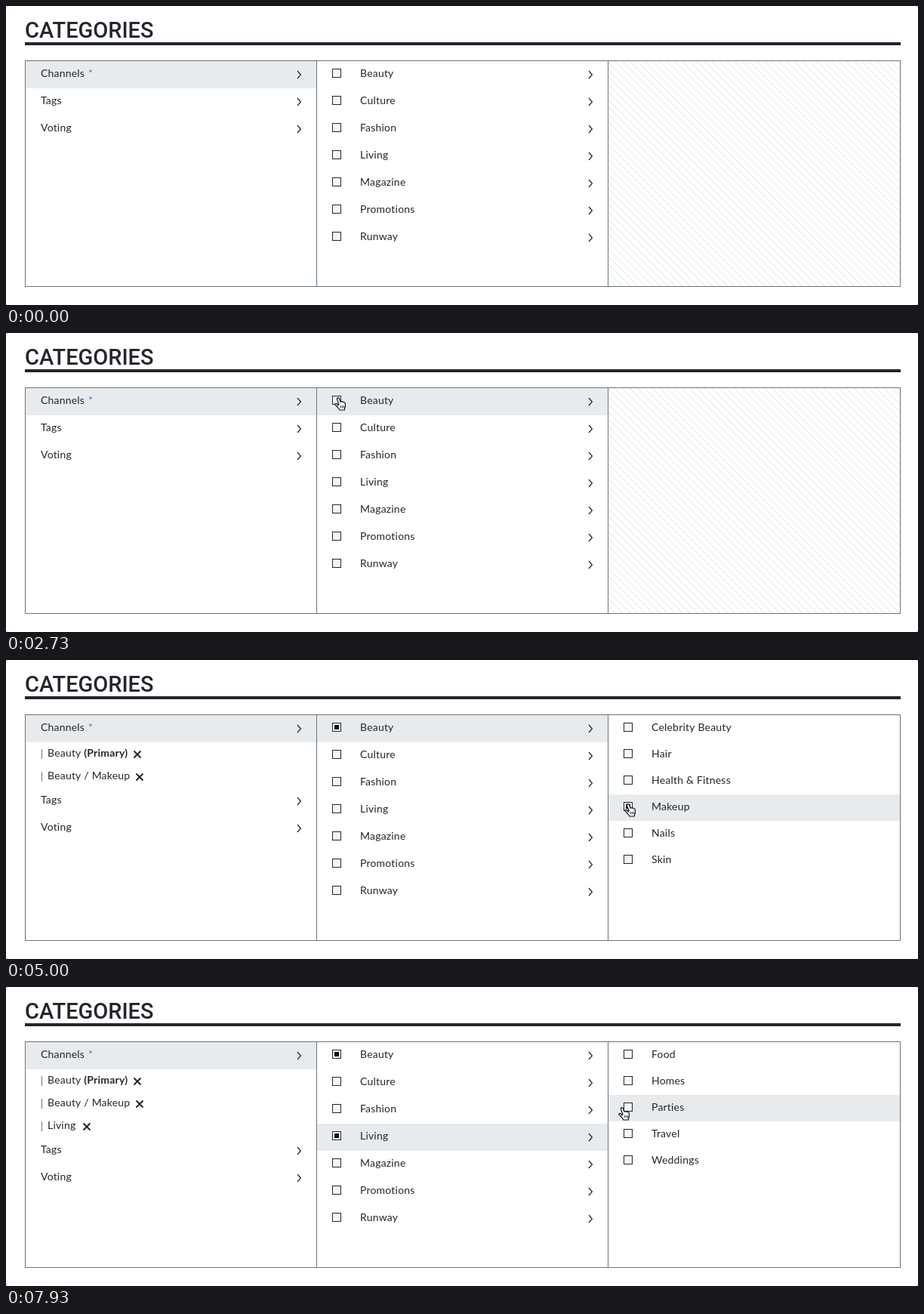
An HTML page with a canvas that plays this animation: 1208 px wide and 396 px high, repeating every 8000 ms.

```html
<!DOCTYPE html>
<html lang="en">
<head>
<meta charset="utf-8">
<title>Categories</title>
<style>
  html, body { margin: 0; width: 100%; height: 100%; overflow: hidden; background: #fff; }
  canvas { display: block; }
</style>
</head>
<body>
<canvas id="stage" width="1208" height="396"></canvas>
<script>
const ctx = document.getElementById('stage').getContext('2d');
const LOOP = 8000;
const INK = '#22262d', EDGE = '#69757d', SHADE = '#e8ebee';
const TOP = 73, BOTTOM = 371, COLS = [26, 412, 798], COL_W = 385;
const ROW = 36, SUB_ROW = 35, CHIP_ROW = 30;

const channels = ['Beauty', 'Culture', 'Fashion', 'Living', 'Magazine', 'Promotions', 'Runway'];
const subLists = {
  Beauty: ['Celebrity Beauty', 'Hair', 'Health & Fitness', 'Makeup', 'Nails', 'Skin'],
  Living: ['Food', 'Homes', 'Parties', 'Travel', 'Weddings']
};
const chips = [
  { at: 2900, label: 'Beauty', bold: '(Primary)', closeX: 174 },
  { at: 4620, label: 'Beauty / Makeup', closeX: 177 },
  { at: 6500, label: 'Living', closeX: 107 }
];
const selections = [
  { name: 'Beauty', at: 2900, ready: 3500 },
  { name: 'Living', at: 6500, ready: 6950 }
];
const checkedAt = { Beauty: 2900, Makeup: 4620, Living: 6500 };

// Pointer hot spot: time, x, y
const SHOW_POINTER = 1730, HAND_FROM = 2100;
const path = [
  [1730, 540, 140], [1870, 438, 91], [2150, 438, 91], [2500, 440, 85],
  [3500, 440, 85], [4000, 838, 184], [4300, 824, 190], [5470, 824, 190],
  [6000, 538, 179], [6300, 436, 191], [7300, 436, 191], [7930, 816, 159],
  [8000, 816, 159]
];

const hand = new Path2D('M5.2 10.8L6 9.5 3.6 3C3.2 1.7 3.8.7 4.8.7S6.2 1.3 6.6 2.3L8 6.2' +
  'C8.6 5.4 9.8 5.4 10.2 6.3 10.9 5.7 12 5.9 12.3 6.9 13.3 6.5 14.2 7 14.3 8.2L14.5 11.5' +
  'C14.5 13.4 13.6 14.2 13.4 15.3V17H6.8C6.6 15.6 5 14.2 4 13 2.9 11.7 1.6 10.7.9 9.8' +
  '.5 9 1.2 8 2.3 8.3 3.5 8.6 4.6 10 5.2 10.8Z');
const knuckles = new Path2D('M8.2 11V14.3M10.3 11V14.3M12.3 11V14.3');
const arrow = new Path2D('M0 0V14.5L3.4 11.3 5.6 16.4 8 15.4 5.8 10.5H10.3Z');

function slope(i, axis) {
  if (i === 0 || i === path.length - 1) return 0;
  const rate = k => (path[k + 1][axis] - path[k][axis]) / (path[k + 1][0] - path[k][0]);
  const a = rate(i - 1), b = rate(i);
  return a * b <= 0 ? 0 : 2 * a * b / (a + b);
}

// Monotone cubic through the path points
function pointer(t) {
  let i = 0;
  while (i < path.length - 2 && path[i + 1][0] <= t) i++;
  const p = path[i], q = path[i + 1], d = q[0] - p[0];
  const u = Math.min(1, Math.max(0, (t - p[0]) / d)), v = 1 - u;
  return [1, 2].map(axis =>
    p[axis] * (1 + 2 * u) * v * v + q[axis] * u * u * (3 - 2 * u) +
    d * u * v * (slope(i, axis) * v - slope(i + 1, axis) * u));
}

function box(x, y, w, h, color) {
  ctx.fillStyle = color;
  ctx.fillRect(x, y, w, h);
}

function text(str, x, y, color = INK, weight = 400) {
  ctx.font = `${weight} 14px Lato, sans-serif`;
  ctx.letterSpacing = '0.2px';
  ctx.fillStyle = color;
  ctx.fillText(str, x, y);
  return ctx.measureText(str).width;
}

function line(points, color, width) {
  ctx.beginPath();
  points.forEach(([x, y]) => ctx.lineTo(x, y));
  ctx.strokeStyle = color;
  ctx.lineWidth = width;
  ctx.stroke();
}

function chevron(x, y) {
  line([[x - 2, y - 5], [x + 2.4, y], [x - 2, y + 5]], INK, 1.2);
}

function checkbox(x, y, on) {
  box(x, y, 12, 12, INK);
  box(x + 1, y + 1, 10, 10, '#f5f6f8');
  if (on) box(x + 3, y + 3, 6, 6, '#111317');
}

function stripes() {
  const step = 7 * Math.SQRT2, w = 386, h = BOTTOM - TOP;
  ctx.save();
  ctx.beginPath();
  ctx.rect(COLS[2], TOP, w, h);
  ctx.clip();
  for (let s = step * 6.5 / 7; s < w + h + step; s += step) {
    const x = COLS[2] + s;
    line([[x - h, TOP], [x, BOTTOM]], '#dfe1e3', 1);
  }
  ctx.restore();
}

function spinner(t) {
  const start = -1.83 + (t - 3330) / 1000 * Math.PI * 2;
  const ring = (from, to, color) => {
    ctx.beginPath();
    ctx.arc(995, 226, 19, from, to);
    ctx.strokeStyle = color;
    ctx.lineWidth = 2;
    ctx.stroke();
  };
  ring(0, Math.PI * 2, '#e6e6e6');
  ring(start, start + Math.PI / 2, '#7c7c7c');
}

function frame() {
  box(0, 0, 1208, 396, '#b9bcbe');
  ctx.beginPath();
  ctx.roundRect(0, 0, 1208, 396, 3);
  ctx.fillStyle = '#fff';
  ctx.fill();
  ctx.font = '500 29px Roboto, sans-serif';
  ctx.letterSpacing = '0px';
  ctx.fillStyle = INK;
  ctx.fillText('CATEGORIES', 25, 42);
  box(25, 48, 1160, 4, INK);
}

function menu(t) {
  box(COLS[0], TOP, COL_W, ROW, SHADE);
  text('Channels', 46, 94);
  text('*', 109, 94, '#3a7cab');
  chevron(388, 91);
  const open = chips.filter(c => t >= c.at);
  open.forEach((c, i) => {
    const y = 128 + i * CHIP_ROW, cy = y - 3;
    box(47, y - 10, 1, 13, '#5f7f9c');
    const w = text(c.label + (c.bold ? ' ' : ''), 55, y);
    if (c.bold) text(c.bold, 55 + w, y, INK, 700);
    line([[c.closeX - 4.5, cy - 4.5], [c.closeX + 4.5, cy + 4.5]], INK, 2);
    line([[c.closeX - 4.5, cy + 4.5], [c.closeX + 4.5, cy - 4.5]], INK, 2);
  });
  ['Tags', 'Voting'].forEach((name, i) => {
    const y = 130 + i * ROW + open.length * CHIP_ROW;
    text(name, 46, y);
    chevron(388, y - 3);
  });
}

function list(names, col, rowH, t, spot, active) {
  const x = COLS[col];
  names.forEach((name, i) => {
    const y = TOP + i * rowH;
    const hover = spot && spot[0] >= x && spot[0] < x + 386 && spot[1] >= y && spot[1] < y + rowH;
    if (hover || name === active) box(x, y, col === 2 ? 386 : COL_W, rowH, SHADE);
    checkbox(x + 20, y + 10, t >= checkedAt[name]);
    text(name, x + 57, y + 21);
    if (col === 1) chevron(774, y + 18);
  });
}

function drawPointer(t, [x, y]) {
  const pointing = t >= HAND_FROM;
  ctx.save();
  ctx.translate(pointing ? x - 5 : x, y);
  ctx.lineJoin = 'round';
  if (pointing) {
    ctx.fillStyle = '#fff';
    ctx.fill(hand);
    ctx.strokeStyle = '#111';
    ctx.lineWidth = 1.2;
    ctx.stroke(hand);
    ctx.lineWidth = 0.9;
    ctx.stroke(knuckles);
  } else {
    ctx.strokeStyle = '#fff';
    ctx.lineWidth = 2;
    ctx.stroke(arrow);
    ctx.fillStyle = '#000';
    ctx.fill(arrow);
  }
  ctx.restore();
}

function draw(now) {
  const t = now % LOOP;
  const spot = t >= SHOW_POINTER ? pointer(t) : null;
  const hoverSpot = t >= HAND_FROM ? spot : null;
  const current = selections.filter(s => t >= s.at).pop();

  frame();
  menu(t);
  list(channels, 1, ROW, t, hoverSpot, current && current.name);
  if (!current) stripes();
  else if (t < current.ready) spinner(t);
  else list(subLists[current.name], 2, SUB_ROW, t, hoverSpot);

  ctx.strokeStyle = EDGE;
  ctx.lineWidth = 1;
  ctx.strokeRect(25.5, 72.5, 1159, 299);
  box(411, TOP, 1, BOTTOM - TOP, EDGE);
  box(797, TOP, 1, BOTTOM - TOP, EDGE);

  if (spot) drawPointer(t, spot);
}

function tick() {
  draw(performance.now());
  requestAnimationFrame(tick);
}
tick();
</script>
</body>
</html>
```
